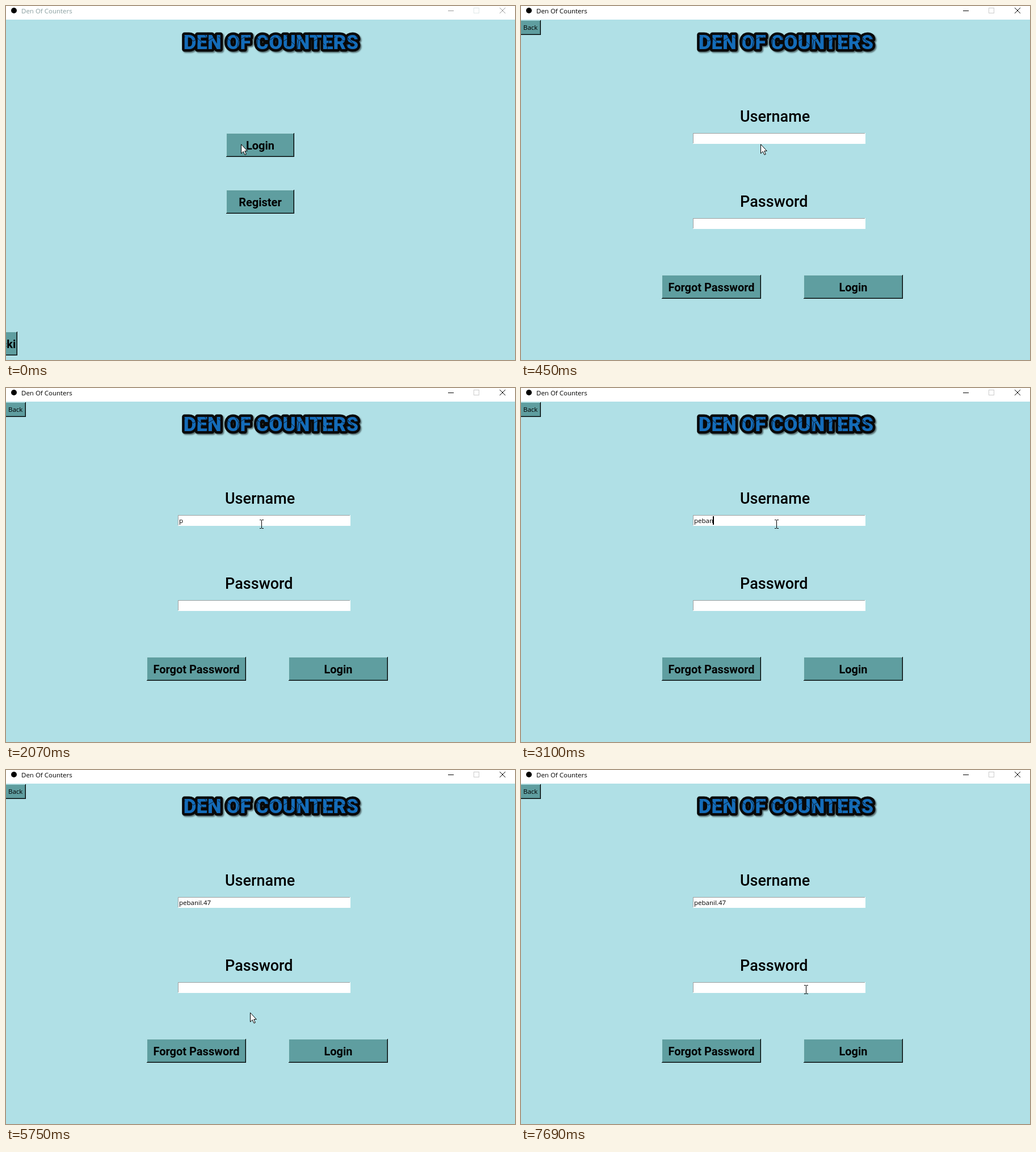
An HTML page for the animation above (8000 ms loop, 897 px wide and 624 px high).

```html
<!DOCTYPE html>
<html lang="en">
<head>
<meta charset="utf-8">
<style>
  html, body { margin: 0; width: 100%; height: 100%; overflow: hidden; background: #b0e0e6 }
  svg { display: block; width: 897px; height: 624px }
  .small { font: 11.5px "Open Sans", sans-serif }
  .label { font: 500 27px Roboto, sans-serif }
  .button { font: 600 20px Roboto, sans-serif; text-anchor: middle }
  .logo {
    font: 900 35px Roboto, sans-serif; text-anchor: middle;
    fill: url(#cracks); stroke: #080808; stroke-width: 9px; stroke-linejoin: round;
    paint-order: stroke; filter: drop-shadow(2px 2px 1px #0008);
  }
  #bar { fill: #000; stroke: #000 }
  #bar.idle { fill: #8a9fa0; stroke: #999 }
  #bar text { stroke: none }
  .maximize { stroke: #ccc }
  .idle .maximize { stroke: #e0e8e8 }
  rect, .crisp { shape-rendering: crispEdges }
</style>
</head>
<body>
<svg viewBox="0 0 897 624">
  <defs>
    <pattern id="cracks" width="53" height="40" patternUnits="userSpaceOnUse">
      <path fill="#146cb9" d="M0 0H53V40H0Z"/>
      <path fill="none" stroke="#0b2138" d="M3 14L12 22 20 17 32 29M14 8L20 17 18 32M32 10L39 21 51 14M39 21L36 36"/>
    </pattern>
  </defs>
  <path fill="#b0e0e6" d="M0 24H897V624H0Z"/>
  <path fill="#fff" d="M0 0H897V24H0Z"/>
  <circle cx="14" cy="8" r="5"/>
  <g id="bar">
    <text class="small" x="27" y="13">Den Of Counters</text>
    <path class="crisp" d="M779 8.5H789"/>
    <path class="crisp maximize" fill="none" d="M824.5 3.5H833.5V12.5H824.5Z"/>
    <path fill="none" d="M870 3L880 13M880 3L870 13"/>
  </g>
  <text class="logo" x="467" y="76">DEN OF COUNTERS</text>
  <g id="menu"></g>
  <g id="form"></g>
  <rect id="caret" width="2" height="15"/>
  <path id="arrow" fill="#fff" stroke="#000" d="M.5 .8V17L4.2 13.4 7 19.3 9.3 18.3 6.8 12.5H11.3Z"/>
  <path id="beam" class="crisp" fill="none" stroke="#000" d="M-3 -7.5H0M1 -7.5H4M.5 -7V7M-3 7.5H0M1 7.5H4"/>
</svg>
<script>
const LOOP = 8000, STEP = 75;
const FORM_OPENS = 380, USER_FOCUS = 1300, PASSWORD_FOCUS = 6160;
const USER_NAME = 'pebanil.47';
const $ = id => document.getElementById(id);

const box = (x, y, w, h, fill) =>
  `<rect x="${x}" y="${y}" width="${w}" height="${h}" fill="${fill}"/>`;
const text = (x, y, style, label) => `<text x="${x}" y="${y}" class="${style}">${label}</text>`;
const raised = (x, y, w, h) => box(x, y, w, h, '#000') + box(x, y, w - 1, h - 1, '#afdde0') +
  box(x + 1, y + 1, w - 2, h - 2, '#396061') + box(x + 1, y + 1, w - 3, h - 3, '#5f9ea0');
const button = (x, y, w, label) => raised(x, y, w, 42) + text(x + w / 2, y + 29, 'button', label);
const entry = (y, label) => text(386, y - 20, 'label', label) + box(303, y, 304, 19, '#fff') +
  box(303, y, 303, 18, '#a0a0a0') + box(304, y + 1, 302, 17, '#fff');

$('menu').innerHTML = button(388, 224, 120, 'Login') + button(388, 324, 120, 'Register') +
  raised(-100, 574, 120, 42) + text(4, 603, 'button', 'cki');
$('form').innerHTML = raised(-1, 25, 36, 26) + text(4, 42, 'small', 'Back') +
  entry(224, 'Username') + entry(374, 'Password') +
  button(248, 474, 175, 'Forgot Password') + button(498, 474, 175, 'Login') +
  '<text id="typed" class="small" x="305" y="238"></text>';

// Pointer strokes: start time, number of steps, end point.
const strokes = [
  [70, 2, 419, 243], [300, 3, 422, 243], [525, 6, 444, 248], [1230, 1, 445, 242],
  [1460, 2, 450, 240], [5440, 3, 333, 385], [5665, 2, 430, 427], [5815, 2, 555, 398],
  [5965, 1, 510, 390], [6130, 4, 502, 388], [7690, 1, 502, 387]
];

// Counts events that come every `gap` ms from `start`, up to `max`.
const count = (t, start, gap, max) =>
  Math.max(0, Math.min(max, Math.floor((t - start) / gap) + 1));

function pointer(t) {
  let x = 414, y = 243;
  for (const [start, steps, endX, endY] of strokes) {
    const p = count(t, start, STEP, steps) / steps;
    x += (endX - x) * p;
    y += (endY - y) * p;
  }
  return [Math.round(x), Math.round(y)];
}

const show = (id, on) => $(id).style.display = on ? '' : 'none';
const inEntry = (x, y) => x >= 303 && x < 607 && (y >= 224 && y < 243 || y >= 374 && y < 393);

function draw(now) {
  const t = now % LOOP;
  const onForm = t >= FORM_OPENS;
  $('bar').setAttribute('class', t < 300 ? 'idle' : '');
  show('menu', !onForm);
  show('form', onForm);

  // The name is typed in two bursts of five keys.
  const typed = USER_NAME.slice(0, count(t, 2070, 220, 5) + count(t, 3560, 330, 5));
  $('typed').textContent = typed;

  const inPassword = t >= PASSWORD_FOCUS;
  const focus = inPassword ? PASSWORD_FOCUS : USER_FOCUS;
  const offset = inPassword || !typed ? 0 : Math.round($('typed').getComputedTextLength());
  $('caret').setAttribute('x', 304 + offset);
  $('caret').setAttribute('y', inPassword ? 376 : 226);
  show('caret', t >= focus && (t - focus) % 896 < 600);

  const [x, y] = pointer(t);
  const overEntry = onForm && inEntry(x, y);
  show('arrow', !overEntry);
  show('beam', overEntry);
  for (const id of ['arrow', 'beam']) $(id).setAttribute('transform', `translate(${x} ${y})`);
  requestAnimationFrame(draw);
}
requestAnimationFrame(draw);
</script>
</body>
</html>
```
